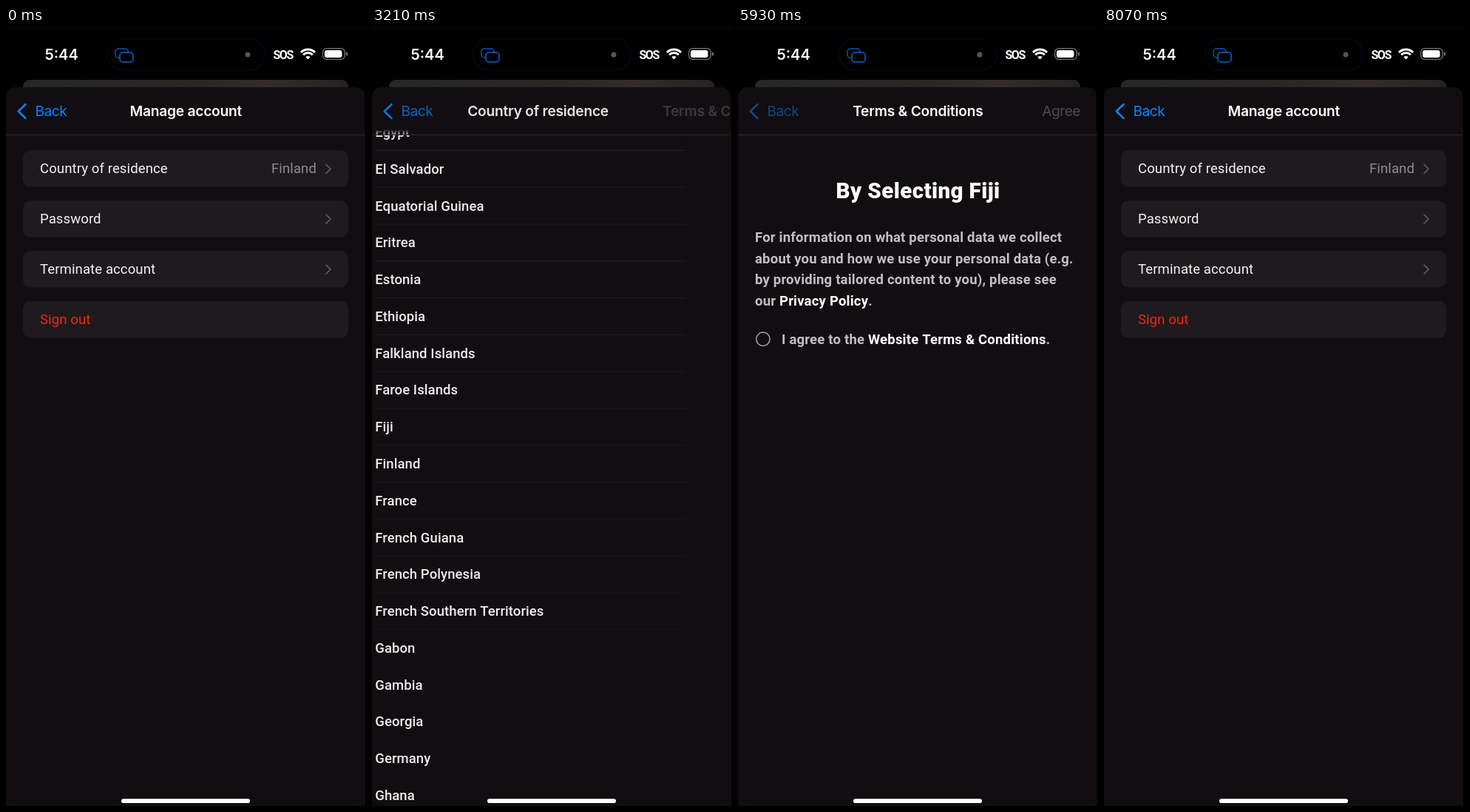
An HTML page with a canvas for the animation above (8.93 s loop, 487 by 1051 pixels).

```html
<!DOCTYPE html>
<html lang="en">
<head>
<meta charset="utf-8">
<title>Manage account</title>
<style>
html, body { margin: 0; width: 100%; height: 100%; overflow: hidden; background: #000; }
canvas { display: block; width: 487px; height: 1051px; }
</style>
</head>
<body>
<canvas id="stage"></canvas>
<script>
const W = 487, H = 1051, LOOP = 8930, ROW = 49.77;
const SHEET = '#110d10', BLUE = '#0a84ff', RED = '#ed2a0c';
const UI = 'Inter, sans-serif', BRAND = 'Roboto, sans-serif';
const COUNTRIES = ['Egypt', 'El Salvador', 'Equatorial Guinea', 'Eritrea', 'Estonia', 'Ethiopia',
  'Falkland Islands', 'Faroe Islands', 'Fiji', 'Finland', 'France', 'French Guiana',
  'French Polynesia', 'French Southern Territories', 'Gabon', 'Gambia', 'Georgia', 'Germany', 'Ghana'];

const canvas = document.getElementById('stage');
const ctx = canvas.getContext('2d');
const dpr = window.devicePixelRatio || 1;
canvas.width = W * dpr;
canvas.height = H * dpr;

const clamp = v => Math.min(1, Math.max(0, v));
const ramp = (t, start, length) => clamp((t - start) / length);

// Critically damped spring from 0 to 1
function spring(t, start, rate = 18) {
  const x = Math.max(0, t - start) * rate / 1000;
  return 1 - (1 + x) * Math.exp(-x);
}

function text(str, x, y, font, color, { align = 'left', spacing = 0 } = {}) {
  ctx.font = font;
  ctx.fillStyle = color;
  ctx.textAlign = align;
  ctx.letterSpacing = spacing + 'px';
  ctx.fillText(str, x, y);
  return x + ctx.measureText(str).width;
}

function box(x, y, w, h, r, fill, stroke, lineWidth = 1.5) {
  ctx.beginPath();
  ctx.roundRect(x, y, w, h, r);
  if (fill) { ctx.fillStyle = fill; ctx.fill(); }
  if (stroke) { ctx.strokeStyle = stroke; ctx.lineWidth = lineWidth; ctx.stroke(); }
}

function line(points, color, width, cap = 'round') {
  ctx.beginPath();
  points.forEach(([x, y]) => ctx.lineTo(x, y));
  ctx.strokeStyle = color;
  ctx.lineWidth = width;
  ctx.lineCap = cap;
  ctx.lineJoin = 'round';
  ctx.stroke();
}

function withAlpha(alpha, draw) {
  if (alpha <= 0) return;
  ctx.save();
  ctx.globalAlpha *= alpha;
  draw();
  ctx.restore();
}

function drawAccount() {
  const font = '400 18.5px ' + BRAND;
  ['Country of residence', 'Password', 'Terminate account', 'Sign out'].forEach((label, i) => {
    const y = 165.3 + 67.9 * i, last = i === 3;
    box(23, y, 440, 49.5, 10, '#1e1a1d');
    text(label, 46, y + 31, font, last ? RED : '#f4f2f4', { spacing: .12 });
    if (!last) line([[433, y + 19], [439, y + 25], [433, y + 31]], '#5c585c', 1.7);
  });
  text('Finland', 420, 196.3, font, '#8f8b8f', { align: 'right', spacing: .12 });
}

function drawCountries() {
  COUNTRIES.forEach((name, i) => {
    const y = 115.7 + ROW * i;
    withAlpha(clamp(1.25 - i / 16), () => line([[23, y], [485, y]], '#211d20', 1.2, 'butt'));
    text(name, 23, y + 31.4, '500 18.5px ' + BRAND, '#f6f4f6', { spacing: .08 });
    if (name === 'Finland') line([[446, y + 25.5], [451, y + 31.5], [460.5, y + 17.5]], RED, 2);
  });
}

function drawSpinner(t) {
  const head = (Math.floor((t - 3790) / 110) + 83) % 8;
  for (let i = 0; i < 8; i++) {
    const c = Math.cos(i * Math.PI / 4), s = Math.sin(i * Math.PI / 4);
    withAlpha(.25 + .4 * (1 - (head - i + 8) % 8 / 7), () =>
      line([[243 + c * 5.5, 600 + s * 5.5], [243 + c * 9.7, 600 + s * 9.7]], '#f0f0f4', 2.6));
  }
}

function drawTerms(t) {
  const shown = loaded(t);
  if (!shown) drawSpinner(t);
  withAlpha(shown, () => {
    const body = '600 18.5px ' + BRAND, grey = '#c3bfc3', spacing = { spacing: .2 };
    text('By Selecting Fiji', 243.5, 229.8, '800 29.5px ' + BRAND, '#fff', { align: 'center', spacing: .4 });
    ['For information on what personal data we collect',
      'about you and how we use your personal data (e.g.',
      'by providing tailored content to you), please see'
    ].forEach((str, i) => text(str, 23, 289 + 28.5 * i, body, grey, spacing));
    let x = text('our ', 23, 374.5, body, grey, spacing);
    x = text('Privacy Policy', x, 374.5, body, '#fff', spacing);
    text('.', x, 374.5, body, grey, spacing);
    box(24.7, 411, 18.4, 18.4, 9.2, null, '#aaa6aa');
    x = text('I agree to the ', 59, 427, body, grey, spacing);
    x = text('Website Terms & Conditions', x, 427, body, '#fff', spacing);
    text('.', x, 427, body, grey, spacing);
  });
}

const loaded = t => ramp(t, 4290, 140);
const PAGES = [
  { title: 'Manage account', draw: drawAccount, back: () => 1 },
  { title: 'Country of residence', draw: drawCountries, back: () => 1 },
  { title: 'Terms & Conditions', draw: drawTerms, back: loaded, agree: true }
];

function drawPage(page, x, t) {
  ctx.save();
  ctx.translate(x, 0);
  ctx.fillStyle = SHEET;
  ctx.fillRect(0, 138, W, H);
  page.draw(t);
  ctx.restore();
}

// Brightness of the back button around a tap
function pressed(t, start) {
  return t < start ? 1 : .5 + .5 * ramp(t, start + 90, 260);
}

function drawHeader(under, top, p, t) {
  const fade = ctx.createLinearGradient(0, 137, 0, 146);
  fade.addColorStop(0, SHEET);
  fade.addColorStop(1, SHEET + '00');
  ctx.fillStyle = fade;
  ctx.fillRect(0, 137, W, 9);
  box(0, 80, 485, 57.5, [12, 12, 0, 0], SHEET);
  line([[0, 144.3], [485, 144.3]], '#2b272a', 1.2, 'butt');

  const title = (page, x, alpha) => withAlpha(alpha, () =>
    text(page.title, x, 119.3, '600 19.2px ' + UI, '#fff', { align: 'center', spacing: -.25 }));
  title(under, 243.3 - 146 * (1 - p), p ** .85);
  title(top, 243.3 + 273 * p, (1 - p) ** .85);

  const label = (x, alpha) => withAlpha(alpha, () =>
    text('Back', x, 119.3, '400 19.2px ' + UI, BLUE, { spacing: -.5 }));
  const press = pressed(t, 5930) * pressed(t, 7210);
  withAlpha(press, () => {
    label(39.5, under.back(t) * clamp(2 * p - 1));
    label(39.5 + 115 * p, top.back(t) * (1 - p));
    withAlpha(under.back(t) * p + top.back(t) * (1 - p), () =>
      line([[26.5, 103], [16.7, 112.5], [26.5, 122]], BLUE, 2.5));
  });
  if (top.agree) withAlpha(1 - p, () =>
    text('Agree', 463, 119.3, '400 19.2px ' + UI, '#4d494c', { align: 'right', spacing: -.5 }));
}

function drawStatusBar() {
  text('5:44', 52.5, 43, '600 20px ' + UI, '#fff');
  text('SOS', 361.5, 41.7, '700 16px ' + BRAND, '#fff', { spacing: -1.5 });
  box(137, 14.5, 213, 43, 21.5, null, '#08081f', 1.2);

  box(148, 28, 17, 12, 4, null, '#0b55b4');
  box(154, 33, 18, 13, 4, '#000', '#0d66d0');
  box(323.5, 32.5, 7, 7, 3.5, '#555');

  // Wi-Fi fan
  for (const r of [4.5, 9, 13.5]) {
    ctx.beginPath();
    if (r < 5) ctx.moveTo(408.5, 42.5);
    ctx.arc(408.5, 42.5, r, -Math.PI * .75, -Math.PI * .25);
    ctx.lineWidth = 3;
    ctx.lineCap = 'butt';
    ctx.strokeStyle = ctx.fillStyle = '#fff';
    if (r < 5) ctx.fill(); else ctx.stroke();
  }

  box(428.7, 27.7, 29.6, 14.6, 5, null, '#77777a', 1.3);
  box(431, 30, 23.5, 10, 3, '#fff');
  box(460, 32.5, 2, 5, 1, '#77777a');
}

function drawBackdrop() {
  ctx.fillStyle = '#000';
  ctx.fillRect(0, 0, W, H);
  ctx.fillStyle = '#0b0530';
  ctx.fillRect(0, 0, W, 1);
  const strip = ctx.createLinearGradient(23, 0, 463, 0);
  strip.addColorStop(0, '#272729');
  strip.addColorStop(.5, '#292625');
  strip.addColorStop(.75, '#352d29');
  strip.addColorStop(1, '#252224');
  box(23, 70, 440, 14, [9, 9, 0, 0], strip);
}

function draw(t) {
  // Depth in the navigation stack: 0 account, 1 countries, 2 terms
  const depth = clamp(spring(t, 1420) - spring(t, 7270)) + spring(t, 3180, 20) - spring(t, 5990);
  const index = Math.min(1, Math.max(0, Math.floor(depth)));
  const under = PAGES[index], top = PAGES[index + 1];
  const p = clamp(1 - (depth - index));

  ctx.setTransform(dpr, 0, 0, dpr, 0, 0);
  drawBackdrop();
  drawStatusBar();

  ctx.save();
  ctx.beginPath();
  ctx.roundRect(0, 80, 486, H - 80, [12, 12, 0, 0]);
  ctx.clip();
  drawPage(under, -146 * (1 - p), t);
  ctx.fillStyle = `rgba(0, 0, 0, ${.2 * (1 - p)})`;
  ctx.fillRect(0, 138, W, H);
  drawPage(top, W * p, t);
  drawHeader(under, top, p, t);
  ctx.restore();

  box(156, 1041.3, 174, 5.7, 2.8, '#fff');
}

function frame() {
  draw(performance.now() % LOOP);
  requestAnimationFrame(frame);
}
frame();
</script>
</body>
</html>
```
